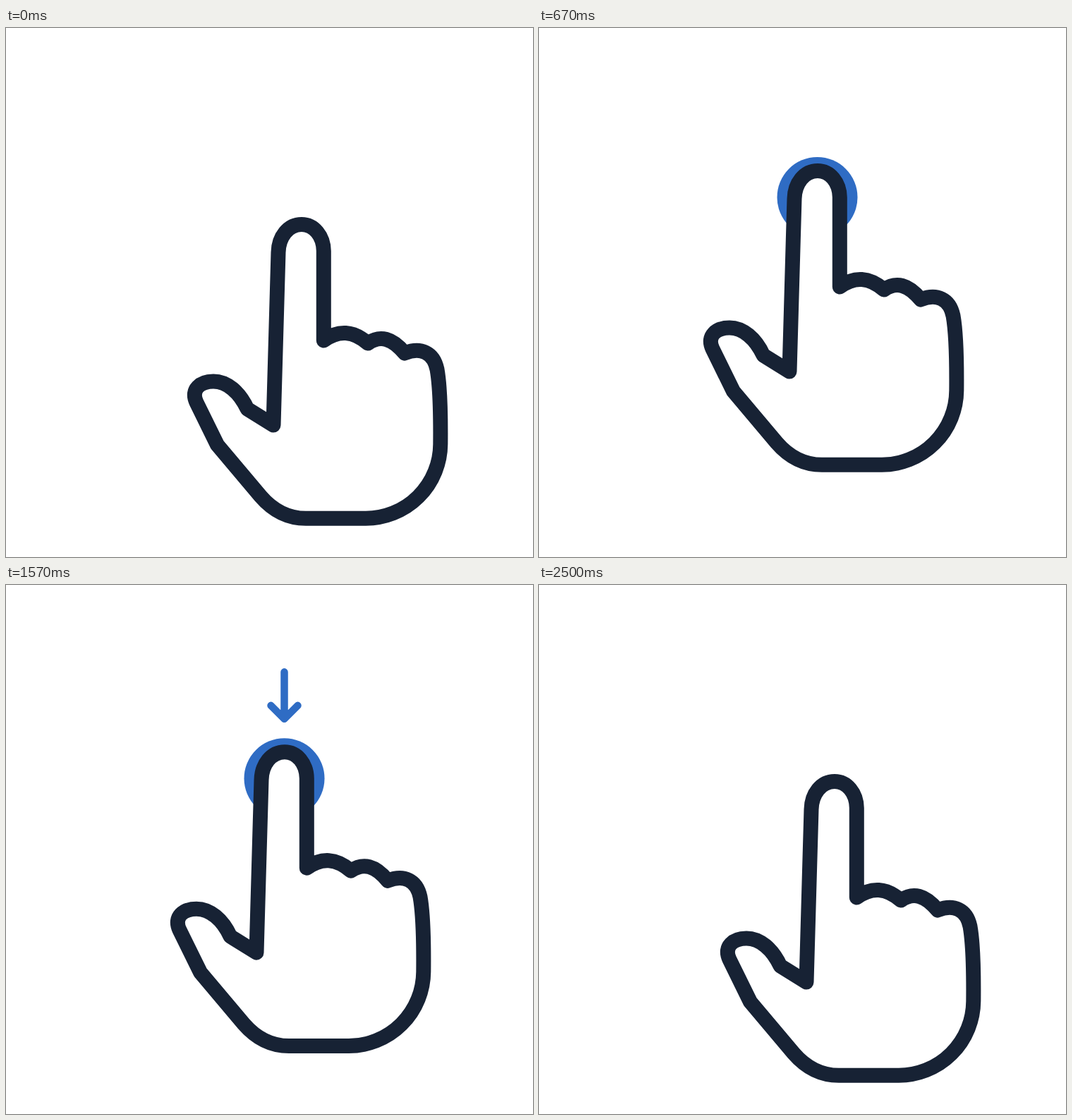
Write an HTML page that moves like this. It is 747 px wide and 750 px high and loops after 2860 ms.

```html
<!DOCTYPE html>
<html lang="en">
<head>
<meta charset="utf-8">
<title>Pull down gesture</title>
<style>
  html, body { margin: 0; width: 100%; height: 100%; overflow: hidden; background: #fff; }
  svg { display: block; width: 100%; height: 100%; }
  path { stroke-linecap: round; stroke-linejoin: round; }
  #outline { fill: #fff; stroke: #172234; stroke-width: 21; }
  #arrow { fill: none; stroke: #2f6cc4; stroke-width: 10.5; }
  #dot { fill: #2f6cc4; }
</style>
</head>
<body>
<svg viewBox="0 0 747 750">
  <path id="arrow"/>
  <g id="hand">
    <circle id="dot" cx="418.5" cy="316"/>
    <path id="outline"/>
  </g>
</svg>
<script>
const LOOP = 2860, STEP = 100 / 3;
const $ = id => document.getElementById(id);
const hand = $('hand'), outline = $('outline'), dot = $('dot'), arrow = $('arrow');

// Smooth rise from 0 to 1 between steps a and b.
function ramp(k, a, b) {
  const u = Math.min(1, Math.max(0, (k - a) / (b - a)));
  return u * u * (3 - 2 * u);
}

// Rises over a..b, holds, then falls over c..d.
const pulse = (k, a, b, c, d) => ramp(k, a, b) - ramp(k, c, d);

function fingerPath(tilt) {
  // The finger leans further the higher up a point lies; its tip moves as one piece.
  const p = (x, y) => `${x + tilt * (443 - Math.max(y, 295)) / 7.9},${y} `;
  const curve = (...points) => 'C' + points.map(([x, y]) => p(x, y)).join('');
  return 'M' + p(450.3, 443) + 'L' + p(450.3, 316) +
    curve([450, 295], [436.7, 278.5], [419, 278.5]) +
    curve([400, 278.5], [386.5, 296], [386, 318]) +
    curve([385.4, 338], [384.9, 358], [384.3, 377]) + 'L379,563';
}

function thumbPath(spread) {
  const dx = -6.5 * spread, dy = 4 * spread;
  return `L${342 + dx * .6},${540 + dy * .6}` +
    `c-11,-24 -29,-39 ${-48 + dx * .4},${-39 + dy * .4}` +
    `c-18,0 -33,11 -24,30 L299.5,${591 + dy * .8}`;
}

function knucklePath() {
  // Arches between neighbouring dips, from the little finger inwards.
  const dips = [[565, 461], [513, 447], [450.3, 443]];
  let path = '';
  for (let i = 1; i < dips.length; i++) {
    const [x, y] = dips[i], [px, py] = dips[i - 1];
    path += `Q${(x + px) / 2},${(y + py) / 2 - 25} ${x},${y} `;
  }
  return path;
}

const PALM = 'L361,664 Q388,695.3 425,695.3 H510 A106,106 0 0 0 615.8,590 ' +
  'Q616.5,515 611,484 C606,460 588,452 565,461 ';

function arrowPath(drop, shaft, head) {
  if (shaft <= 0 && head <= 0) return '';
  const x = 394.5, tip = 166 + drop, arm = 19 * head;
  return `M${x},${tip - 66.5 * shaft} V${tip} M${x - arm},${tip - arm} l${arm},${arm} l${arm},${-arm}`;
}

function draw(ms) {
  const k = Math.floor((ms % LOOP + 4) / STEP);
  const x = -24 * pulse(k, 0, 10, 65, 75);
  const pull = ramp(k, 40, 55);
  const y = -76 * (ramp(k, 0, 10) - pull);
  const release = pulse(k, 55, 65, 65, 75);
  const tilt = pulse(k, 0, 10, 10, 20) + release;
  const spread = .3 * pulse(k, 10, 15, 15, 20) + release;

  hand.setAttribute('transform', `translate(${x} ${y})`);
  outline.setAttribute('d', fingerPath(tilt) + thumbPath(spread) + PALM + knucklePath() + 'Z');
  dot.setAttribute('r', 57 * pulse(k, 15, 20, 56, 60));
  arrow.setAttribute('d', arrowPath(53 * pull, pulse(k, 20, 36, 49, 56), pulse(k, 20, 37, 47, 56)));
}

let start;
function tick(now) {
  start ??= now;
  draw(Math.max(0, now - start));
  requestAnimationFrame(tick);
}
draw(0);
requestAnimationFrame(tick);
</script>
</body>
</html>
```
